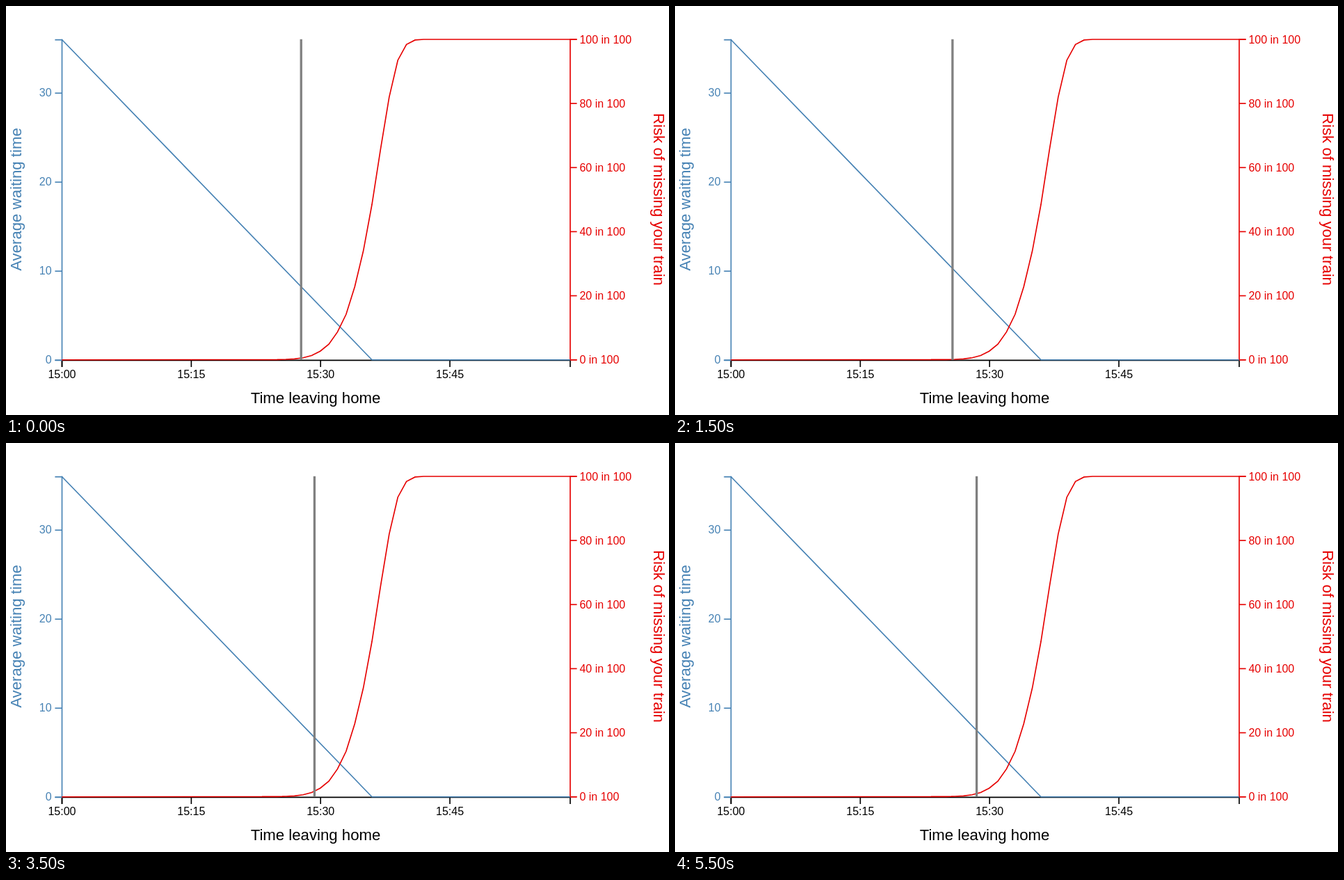
Recreate the animation shown at these times as an HTML page. Size 953x588 px, loop 7.5 s.

```html
<!DOCTYPE html>
<html lang="en">
<head>
<meta charset="utf-8">
<title>Waiting time and risk</title>
<style>
  html, body { margin: 0; width: 100%; height: 100%; overflow: hidden; background: #fff; }
  svg { display: block; width: 953px; height: 588px; font: 16px "Liberation Sans", Arial, sans-serif; }
  path { fill: none; stroke-width: 1.65; }
  .title { font-size: 22.2px; text-anchor: middle; }
</style>
</head>
<body>
<svg viewBox="0 0 953 588" xmlns="http://www.w3.org/2000/svg"></svg>
<script>
const svg = document.querySelector('svg');
const BLUE = '#4682b4', RED = '#e60000';
const LEFT = 80, RIGHT = 811, TOP = 48, BOTTOM = 508.7;
const TICK = 9.6;

const xOf = minute => LEFT + minute / 59 * (RIGHT - LEFT);
const scaleY = max => value => BOTTOM - value / max * (BOTTOM - TOP);
const waitY = scaleY(36), riskY = scaleY(100);

function add(tag, attrs, text = '') {
  const node = document.createElementNS(svg.namespaceURI, tag);
  for (const key in attrs) node.setAttribute(key, attrs[key]);
  node.textContent = text;
  svg.append(node);
  return node;
}
const stroke = (d, color) => add('path', { d, stroke: color });
const label = (x, y, anchor, fill, text) => add('text', { x, y, 'text-anchor': anchor, fill }, text);
const title = (x, y, angle, fill, text) =>
  add('text', { class: 'title', fill, transform: `translate(${x} ${y}) rotate(${angle})` }, text);
const polyline = (points, color) => stroke('M' + points.map(p => p.join(' ')).join('L'), color);

// Bottom axis
const axisY = BOTTOM + 0.7;
stroke(`M${LEFT + .5} ${axisY + TICK}V${axisY}H${RIGHT}V${axisY + TICK}`, '#000');
for (const minute of [0, 15, 30, 45]) {
  const x = xOf(minute) + 0.5;
  stroke(`M${x} ${axisY}v${TICK}`, '#000');
  label(x, 534.6, 'middle', '#000', `15:${String(minute).padStart(2, '0')}`);
}

// Left axis
stroke(`M${LEFT - TICK} ${TOP + .6}H${LEFT + .5}V${axisY}H${LEFT - TICK}`, BLUE);
for (const value of [0, 10, 20, 30]) {
  const y = waitY(value) + 0.5;
  stroke(`M${LEFT} ${y}h${-TICK}`, BLUE);
  label(65.6, y + 5.2, 'end', BLUE, value);
}

// Right axis
stroke(`M${RIGHT + TICK} ${TOP}H${RIGHT}V${BOTTOM}H${RIGHT + TICK}`, RED);
for (let value = 0; value <= 100; value += 20) {
  const y = riskY(value);
  stroke(`M${RIGHT} ${y}h${TICK}`, RED);
  label(824.4, y + 5.5, 'start', RED, `${value} in 100`);
}

// Curves
polyline([0, 36, 59].map(m => [xOf(m), waitY(Math.max(0, 36 - m))]), BLUE);
const RISE_START = 25;
const rise = [.08, .15, .3, .65, 1.35, 2.7, 4.9, 8.7, 14.2, 22.8, 34, 48.5, 65.8, 82, 93.5, 98.4, 99.8, 100];
polyline([[LEFT, BOTTOM], ...rise.map((r, i) => [xOf(RISE_START + i), riskY(r)]), [RIGHT, TOP]], RED);

title(22.3, 278, -90, BLUE, 'Average waiting time');
title(931, 278, 90, RED, 'Risk of missing your train');
title(445, 571, 0, '#000', 'Time leaving home');

// Marker jumps every half second, then rests on the last stop
const marker = add('rect', { y: TOP - .2, width: 3.3, height: BOTTOM - TOP + .4, fill: '#808080' });
const STEP = 500, LOOP = 7500;
const stops = [424.2, 370.2, 408.6, 398.9, 413.7, 407, 425.7, 443.4, 440.4, 468.8, 451.6, 433.6];

function draw(time) {
  const step = Math.floor(time % LOOP / STEP);
  const x = stops[Math.min(step, stops.length - 1)];
  marker.setAttribute('x', x - 1.65);
}

function frame(now) {
  draw(now);
  requestAnimationFrame(frame);
}
draw(0);
requestAnimationFrame(frame);
</script>
</body>
</html>
```
